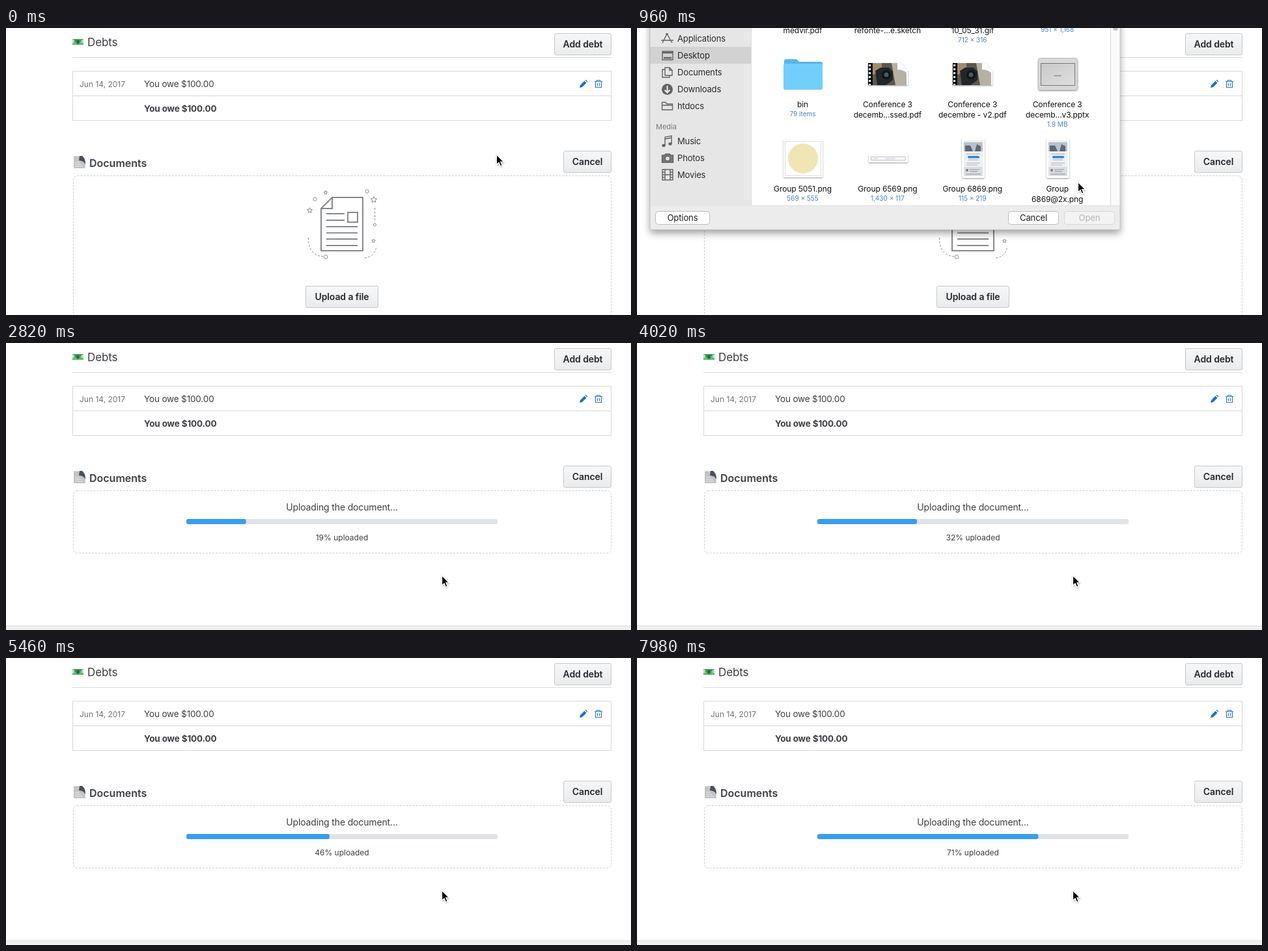
Recreate the animation shown at these times as an HTML page. Size 960 px wide and 442 px high, loop 8 s.

```html
<!DOCTYPE html>
<html lang="en">
<head>
<meta charset="utf-8">
<title>Document upload</title>
<style>
html, body { margin: 0; width: 100%; height: 100%; overflow: hidden; background: #fff; }
svg { display: block; width: 100vw; height: 100vh; }
text { font-family: Inter, Roboto, sans-serif; font-size: 14px; letter-spacing: -.1px; fill: #3c3f43; }
.mid text, .mid { text-anchor: middle; }
.btn text { font-weight: 600; fill: #25282c; text-anchor: middle; }
.row { font-size: 13.5px; letter-spacing: -.15px; }
.side { font-size: 13px; letter-spacing: -.15px; fill: #2b2b2b; }
.file { font-size: 12px; fill: #111; }
.size { font-size: 10px; letter-spacing: 0; fill: #4a80c8; }
.mac { font-size: 13px; fill: #1b1b1b; }
</style>
</head>
<body>
<svg viewBox="0 0 960 442" preserveAspectRatio="none">
  <defs>
    <linearGradient id="face" x2="0" y2="1"><stop stop-color="#f5f7f9"/><stop offset="1" stop-color="#e9ebec"/></linearGradient>
    <linearGradient id="slide" x2="1" y2="1"><stop stop-color="#c9c9c9"/><stop offset="1" stop-color="#dedede"/></linearGradient>
    <filter id="shade" x="-10%" y="-10%" width="120%" height="125%"><feDropShadow dx="0" dy="5" stdDeviation="6" flood-opacity=".38"/></filter>
    <filter id="lift" x="-20%" y="-20%" width="140%" height="150%"><feDropShadow dx="0" dy="1" stdDeviation="1" flood-opacity=".4"/></filter>
    <g id="pdf" filter="url(#lift)">
      <path d="M0 0H51L61 13V34H0Z" fill="#fff"/>
      <path d="M7 0H48L59 14V34H7Z" fill="#5d564f"/>
      <path d="M36 0H48L59 14V34H42Z" fill="#b7b0a4"/>
      <path d="M7 0H21V13L7 18Z" fill="#a28b70"/>
      <path d="M11 12L19 7H32L38 13V26L27 34H14Z" fill="#20262b"/>
      <circle cx="28" cy="18" r="7" fill="#111619"/>
      <circle cx="28" cy="18" r="3.5" fill="#485a66"/>
      <path d="M45 0H51L61 13V17Q55 10 45 10Z" fill="#fafafa"/>
      <path d="M0 0H7V34H0Z" fill="#111"/>
      <path d="M2.5 2V34" stroke="#fff" stroke-width="3" stroke-dasharray="3 3"/>
    </g>
    <g id="phone" filter="url(#lift)">
      <rect width="35" height="61" rx="2" fill="#fff"/>
      <rect x="3" y="3" width="29" height="55" fill="#eef0f3"/>
      <path d="M3 6H32V20H3Z" fill="#b8c2cd"/>
      <path d="M5 20V11H13L17 20M20 20L23 9L29 12V20" fill="#5d6874"/>
      <path d="M7 24H28M10 33H25M7 38H28M7 41H24" stroke="#aab0b8" stroke-width="1.2"/>
      <rect x="9" y="27" width="18" height="3.5" rx="1.5" fill="#2d85df"/>
      <path d="M3 44H32V58H3Z" fill="#dadde2"/>
      <circle cx="8" cy="49" r="2" fill="#a06c57"/>
      <path d="M12 48H27M12 51H24M6 55H29" stroke="#8e949c"/>
    </g>
  </defs>
  <rect width="960" height="442" fill="#fff"/>

  <rect x="102" y="17" width="17" height="9" rx="1" fill="#3f9a5a"/>
  <path d="M102 23L119 19V26H102Z" fill="#5fbd70"/>
  <rect x="102" y="18" width="3" height="5" fill="#b8dcc0"/><rect x="116" y="18" width="3" height="5" fill="#b8dcc0"/>
  <ellipse cx="110.500" cy="21.500" rx="2.500" ry="3" fill="#286b40"/>
  <text x="125" y="28" style="font-size:17px">Debts</text>
  <path d="M102 45.500H930" stroke="#dcdcdc"/>
  <path d="M102.500 66.500H929.500V142.500H102.500ZM102.500 104.500H929.500" fill="none" stroke="#d8d8d8"/>
  <text x="113" y="91" style="font-size:12px;fill:#707376;letter-spacing:0">Jun 14, 2017</text>
  <text x="212" y="91" class="row">You owe $100.00</text>
  <text x="212" y="129" class="row" font-weight="700">You owe $100.00</text>
  <path d="M881 92L882 88L888.500 81.500L891.500 84.500L885 91ZM889.500 80.500L890.800 79.700L893.200 82.200L892.500 83.500Z" fill="#1f6fd0"/>
  <path d="M904 82.500H916M907.500 82V80.500H912.500V82M905.500 83V91.500H914.500V83M908.500 85V89.500M911.500 85V89.500" fill="none" stroke="#3079d3" stroke-width="1.200"/>

  <path d="M104 197H117L122 202V216H104Z" fill="#d6d6d6"/>
  <path d="M104 198H113L121 209V216H104Z" fill="#c2c3c4"/>
  <path d="M113 197H117Q122 201 122 210Q119 204 112 204Z" fill="#48505a"/>
  <path d="M106 207H113M106 210H116M106 213H118" stroke="#e8e8e8"/>
  <text x="128" y="214" style="font-size:16px;font-weight:600;letter-spacing:0">Documents</text>
  <rect id="zone" x="103.500" y="227.500" width="826" height="260" rx="6" fill="none" stroke="#cfcfcf" stroke-dasharray="3 2"/>

  <g id="drop">
    <g id="art" fill="none" stroke="#86898c">
      <path d="M501 261H548V343H484V278ZV278H484M492 286H520M492 296H520M492 306H540M492 315.500H540M492 325H540M492 335H540M525 284H540V299H525Z" stroke-width="2"/>
      <path d="M464.500 323C464 342 474 351 487 352M551 354Q566 353 569 336M566.500 277V296" stroke-dasharray="3 2.500"/>
    </g>
  </g>

  <g id="upload">
    <g class="mid">
      <text x="516" y="258" class="row" style="font-size:14px">Uploading the document...</text>
      <text id="pct" x="516" y="304" style="font-size:12px;letter-spacing:0"></text>
    </g>
    <rect x="277" y="271" width="478" height="8" rx="3" fill="#dfe2e6"/>
    <rect id="bar" x="277" y="271" height="8" rx="3" fill="#389ef2"/>
    <rect y="435" width="960" height="7" fill="#f0f0f0"/>
    <path d="M0 435.500H960" stroke="#dcdcdc"/>
  </g>
  <g id="buttons"></g>

  <g id="dialog">
    <rect x="20" y="-60" width="722" height="371" fill="#ececec" filter="url(#shade)"/>
    <rect x="20" y="-60" width="155" height="333" fill="#e7e6e7"/>
    <rect x="20" y="29" width="155" height="26" fill="#d3d2d3"/>
    <rect x="176" y="-60" width="551" height="333" fill="#fff"/>
    <rect x="727" y="-60" width="15" height="333" fill="#fafafa"/>
    <path d="M175.500 -60V273M727.500 -60V273" stroke="#dadada"/>
    <rect x="731" y="-60" width="8" height="64" rx="4" fill="#c1c1c1"/>
    <g id="side" fill="none" stroke="#636363" stroke-width="1.400">
      <path d="M39 23L46 9L54 23M37 19H56M44 9H48"/>
      <path d="M39 36H55V49H39Z"/><path d="M39 38H55M41 46H53" stroke-width="2.500"/>
      <path d="M43 61H50L54 65V73H43ZM43 64H39V76H50V73M50 61V65H54"/>
      <circle cx="46.500" cy="94.500" r="8.500" fill="#636363" stroke="none"/>
      <path d="M46.500 89V99M42.500 95.500L46.500 99.500L50.500 95.500" stroke="#eee" stroke-width="2"/>
      <path d="M38.500 126V114.500H44L46 117H54.500V126ZM38.500 119H54.500"/>
      <path d="M43 181V168L53 166V178M43 171L53 169"/>
      <ellipse cx="41" cy="181" rx="2" ry="1.500" fill="#636363"/><ellipse cx="51" cy="178.500" rx="2" ry="1.500" fill="#636363"/>
      <path d="M38.500 196H42L44 194H50L52 196H55.500V207H38.500Z" fill="#777"/>
      <circle cx="47" cy="201" r="3.800" fill="#ddd"/>
      <path d="M39 218H55V234H39ZM43 218V234M51 218V234M43 226H51M39 222H43M39 226H43M39 230H43M51 222H55M51 226H55M51 230H55"/>
    </g>
    <text x="29" y="156" style="font-size:11px;fill:#777;letter-spacing:0">Media</text>
    <path d="M226 51Q226 48 229 48H245L249 52H282Q285 52 285 55V91Q285 95 281 95H229Q225 95 225 91Z" fill="#58b5e5"/>
    <rect x="225" y="55" width="60" height="40" rx="3" fill="#72cefa"/>
    <use href="#pdf" x="355" y="54"/><use href="#pdf" x="485" y="54"/>
    <rect x="616.500" y="46.500" width="60" height="49" rx="3" fill="#d8d8d8" stroke="#bdbdbd" filter="url(#lift)"/>
    <rect x="620.500" y="54.500" width="52" height="34" fill="url(#slide)" stroke="#777"/>
    <path d="M641 73.500H652" stroke="#777" stroke-width="1.500" stroke-dasharray="2 .7"/>
    <rect x="225" y="172" width="60" height="58" fill="#fff" filter="url(#lift)"/>
    <rect x="227.500" y="174.500" width="55" height="53" fill="none" stroke="#ddd"/>
    <circle cx="255" cy="201" r="23" fill="#f0e5b4"/>
    <rect x="356" y="195" width="60" height="12" fill="#fff" filter="url(#lift)"/>
    <path d="M359.500 198.500H412.500V203.500H359.500ZM363 201H370M381 201H397" fill="none" stroke="#b6bdc5"/>
    <use href="#phone" x="499" y="170"/><use href="#phone" x="629" y="170"/>
    <g id="files" class="mid"></g>
    <path d="M20 273.500H742" stroke="#e2e2e2"/>
    <g id="actions" class="mid"></g>
    <path d="M20 -60V310.500H742V-60" fill="none" stroke="#bcbcbc" stroke-width=".7"/>
  </g>

  <path id="cursor" d="M0 0V15.500L3.600 12.200L6 17.700L8.600 16.600L6.300 11.200H11Z" fill="#000" stroke="#fff" stroke-width="1.200" filter="url(#lift)"/>
</svg>
<script>
const LOOP = 8000;
const $ = id => document.getElementById(id);

function add(parent, tag, attrs, label) {
  const el = document.createElementNS("http://www.w3.org/2000/svg", tag);
  for (const key in attrs) el.setAttribute(key, attrs[key]);
  if (label) el.textContent = label;
  return parent.appendChild(el);
}

function pageButton(parent, x, y, width, label) {
  const g = add(parent, "g", { class: "btn" });
  add(g, "rect", { x: x + .5, y: y + .5, width: width - 1, height: 33, rx: 2.5, fill: "url(#face)", stroke: "#c6c8ca" });
  add(g, "text", { x: x + width / 2, y: y + 22 }, label);
}

function macButton(x, width, label, dim) {
  add($("actions"), "rect", { x: x + .5, y: 282.5, width: width - 1, height: 20, rx: 4, fill: dim ? "#f3f3f3" : "#fff", stroke: dim ? "#d6d6d6" : "#bdbdbd" });
  const text = add($("actions"), "text", { x: x + width / 2, y: 297, class: "mac" }, label);
  if (dim) text.style.fill = "#b5b5b5";
}

function star(x, y, r) {
  const points = Array.from({ length: 10 }, (_, i) => {
    const a = i * Math.PI / 5 - Math.PI / 2, d = i % 2 ? r * .45 : r;
    return [x + d * Math.cos(a), y + d * Math.sin(a)];
  });
  add($("art"), "polygon", { points: points.join(" ") });
}

// Centred file label: lines from a baseline, then its size
function fileLabel(col, y, lines, size) {
  const x = 254.5 + col * 130.4;
  lines.forEach((line, i) => add($("files"), "text", { x, y: y + i * 16, class: "file" }, line));
  if (size) add($("files"), "text", { x, y: y + lines.length * 16 - 2, class: "size" }, size);
}

pageButton($("buttons"), 842, 8, 88, "Add debt");
pageButton($("buttons"), 856, 189, 74, "Cancel");
pageButton($("drop"), 460, 397, 112, "Upload a file");
macButton(28, 84, "Options");
macButton(570, 78, "Cancel");
macButton(656, 78, "Open", true);

[[491, 253.5, 3], [466.5, 281, 4.2], [565, 264.5, 5], [564.5, 328, 3]].forEach(s => star(...s));
[[474.5, 263.5, 2.6], [554.5, 251.5, 2.6], [566.5, 303, 2], [491, 352.5, 2.8]]
  .forEach(([cx, cy, r]) => add($("art"), "circle", { cx, cy, r }));

["Applications", "Desktop", "Documents", "Downloads", "htdocs", "Music", "Photos", "Movies"].forEach((name, i) =>
  add($("dialog"), "text", { x: 62, y: 21 + i * 26 + (i > 4 ? 28 : 0), class: "side" }, name));

fileLabel(0, 8, ["medvir.pdf"]);
fileLabel(1, 8, ["refonte-...e.sketch"]);
fileLabel(2, 8, ["10_05_31.gif"], "712 × 316");
fileLabel(3, -8, ["capture.png"], "951 × 1,168");
fileLabel(0, 122, ["bin"], "79 items");
fileLabel(1, 122, ["Conference 3", "decemb...ssed.pdf"]);
fileLabel(2, 122, ["Conference 3", "decembre - v2.pdf"]);
fileLabel(3, 122, ["Conference 3", "decemb...v3.pptx"], "1.9 MB");
fileLabel(0, 252, ["Group 5051.png"], "569 × 555");
fileLabel(1, 252, ["Group 6569.png"], "1,430 × 117");
fileLabel(2, 252, ["Group 6869.png"], "115 × 219");
fileLabel(3, 252, ["Group", "6869@2x.png"]);

const clamp = v => Math.max(0, Math.min(1, v));
const smooth = v => v * v * (3 - 2 * v);

// Keys are [time, value, value...]
function track(keys, t, ease = v => v) {
  let i = 0;
  while (i < keys.length - 2 && t >= keys[i + 1][0]) i++;
  const [a, b] = [keys[i], keys[i + 1]];
  const k = ease(clamp((t - a[0]) / (b[0] - a[0])));
  return a.slice(1).map((v, j) => v + (b[j + 1] - v) * k);
}

const pointer = [[60, 753.5, 195], [320, 533.5, 411], [560, 533.5, 411], [780, 646, 78], [840, 646, 78], [1020, 688, 291], [1080, 688, 291], [1320, 669.5, 358]];
const progress = [[1200, 0], [1680, 7], [4020, 32], [5460, 46], [6900, 61], [7980, 71]];
const OPEN = 380, CLOSE = 1080, START = 1200;

function draw(t) {
  const [x, y] = track(pointer, t, smooth);
  $("cursor").setAttribute("transform", `translate(${x} ${y})`);

  const shown = smooth(clamp((t - OPEN) / 120)) - smooth(clamp((t - CLOSE) / 120));
  $("dialog").setAttribute("transform", `translate(0 ${(shown - 1) * 335})`);
  $("dialog").style.display = shown > 0 ? "" : "none";

  const uploading = t >= START;
  $("drop").style.display = uploading ? "none" : "";
  $("upload").style.display = uploading ? "" : "none";
  $("zone").setAttribute("height", uploading ? 96 : 260);

  const [done] = track(progress, t);
  $("bar").setAttribute("width", 4.78 * done);
  $("pct").textContent = Math.floor(done + .05) + "% uploaded";
}

function tick() {
  draw(performance.now() % LOOP);
  requestAnimationFrame(tick);
}
tick();
</script>
</body>
</html>
```
